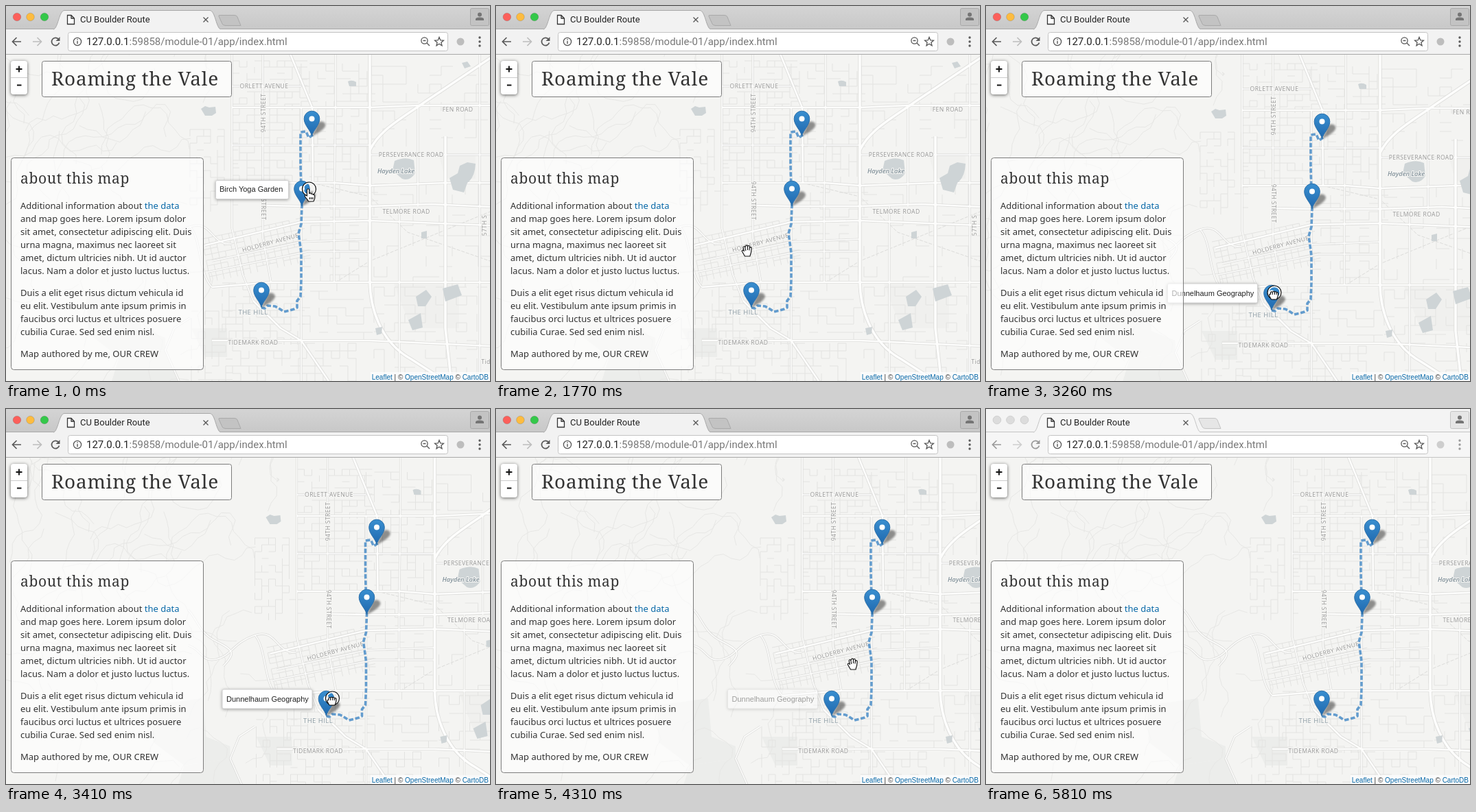
An HTML page that plays this animation: 705 px wide and 547 px high, repeating every 5910 ms.

```html
<!DOCTYPE html>
<html lang="en">
<head>
<meta charset="utf-8">
<title>CU Boulder Route</title>
<style>
html, body { margin: 0; width: 100%; height: 100%; overflow: hidden; background: #f4f4f2; }
svg { display: block; width: 705px; height: 547px; }
text { white-space: pre; }
.ui { font-family: Roboto, sans-serif; }
.serif { font-family: "Noto Serif", serif; fill: #333; }
.body { font: 13px "Noto Sans", sans-serif; fill: #333; }
.small { font: 10px "Liberation Sans", Arial, sans-serif; fill: #333; }
.tip { font: 11px "Liberation Sans", Arial, sans-serif; fill: #222; }
.link { fill: #0768a8; }
.labels { font: 8.6px "Open Sans", sans-serif; letter-spacing: .4px; fill: #979797;
  text-anchor: middle; paint-order: stroke; stroke: #f6f6f4; stroke-width: 2px; }
.box { fill: #fff; fill-opacity: .64; stroke: #7c7c7c; }
.zoom { filter: drop-shadow(0 1px 2.5px rgba(0,0,0,.6)); }
.tipbox { fill: #fff; stroke: #d2d2d2; filter: drop-shadow(0 1px 2px rgba(0,0,0,.35)); }
#chrome { --icon: #5a5a5a; --faint: #bdbdbd; --line: #a9a9a9; --tab: #c3c3c3; --bar: #f2f2f2; }
#chrome.idle { --icon: #9b9b9b; --faint: #cecece; --line: #c4c4c4; --tab: #e6e6e6; --bar: #f6f6f6; }
.bar { fill: url(#titlebar); }
.idle .bar { fill: #f4f4f4; }
.idle .light { fill: #dcdcdc; stroke: #d0d0d0; }
</style>
</head>
<body>
<svg viewBox="0 0 705 547" xmlns="http://www.w3.org/2000/svg">
  <defs>
    <linearGradient id="titlebar" x2="0" y2="1"><stop stop-color="#d4d4d4"/><stop offset="1" stop-color="#c8c8c8"/></linearGradient>
    <linearGradient id="blue" x2="0" y2="1"><stop stop-color="#3a8fd0"/><stop offset="1" stop-color="#1f68ae"/></linearGradient>
    <filter id="soft" x="-50%" y="-50%" width="200%" height="200%"><feGaussianBlur stdDeviation="1.8"/></filter>
    <g id="pin">
      <path d="M0 0L9-20Q17-24 20-17Q20-10 0 0Z" fill="#000" opacity=".42" filter="url(#soft)"/>
      <path d="M0-.5C-2-9-11.3-16-11.3-25.5A11.3 11.3 0 0 1 11.3-25.5C11.3-16 2-9 0-.5Z" fill="url(#blue)" stroke="#2b6fa9"/>
      <circle cy="-25.5" r="4" fill="#fff"/>
    </g>
  </defs>

  <rect width="705" height="547" fill="#f4f4f2"/>
  <g id="map">
    <g id="land"></g>
    <g id="trails" fill="none" stroke="#e7e7e5"></g>
    <g id="streets" fill="none" stroke="#e3e3e1"></g>
    <g id="casing" fill="none" stroke="#dcdcda" stroke-linejoin="round"></g>
    <g id="roads" fill="none" stroke="#fdfdfc" stroke-linejoin="round"></g>
    <g id="water" fill="#ced4d6"></g>
    <g id="labels" class="labels"></g>
    <path fill="none" stroke="#4b8dc8" stroke-opacity=".85" stroke-width="3.6" stroke-dasharray="6.5 2.8" stroke-linejoin="round"
      d="M372 440L377 441L381 437L392 438L399 442L405 446L413 444L420 442L424 440V430L429 424L430 400V360L428 345L426 332L430 318L431 292L430 270L429 230V184L437 183L441 192L447 188"/>
    <use href="#pin" x="445.5" y="190"/>
    <use href="#pin" x="431" y="292"/>
    <use href="#pin" x="372" y="440"/>
    <g id="tipA"><rect class="tipbox" x="305.5" y="254.5" width="106" height="27" rx="2"/><text class="tip" x="311" y="271">Birch Yoga Garden</text></g>
    <g id="tipB"><rect class="tipbox" x="220.5" y="401" width="131" height="28" rx="2"/><text class="tip" x="226.500" y="418.500">Dunnelhaum Geography</text></g>
  </g>

  <g class="zoom"><rect x="7" y="80" width="24" height="49" rx="4" fill="#fff"/></g>
  <path d="M7 104.500H31" stroke="#ccc"/>
  <path d="M14.500 92H23.500M19 87.500V96.500M16 115.500H22.500" stroke="#111" stroke-width="1.900"/>

  <rect class="box" x="52.500" y="80.500" width="276" height="52" rx="3"/>
  <text class="serif" x="66" y="116" font-size="28" letter-spacing=".7">Roaming the Vale</text>
  <rect class="box" x="7.500" y="221.500" width="280" height="309" rx="4"/>
  <text class="serif" x="21" y="259" font-size="21" letter-spacing=".65">about this map</text>
  <g id="about" class="body"></g>

  <rect x="531" y="534" width="174" height="13" fill="#fff" fill-opacity=".7"/>
  <text class="small" x="703" y="544.500" text-anchor="end"><tspan class="link">Leaflet</tspan> | © <tspan class="link">OpenStreetMap</tspan> © <tspan class="link">CartoDB</tspan></text>

  <g id="chrome" class="ui">
    <rect class="bar" width="705" height="34"/>
    <rect y="33" width="705" height="38" style="fill:var(--bar)"/>
    <path d="M0 33.500H705M0 70.500H705" style="stroke:var(--line)"/>
    <path d="M69 34C76 33 77 7 85 6.500H297C305 7 306 33 313 34" style="fill:var(--bar);stroke:var(--line)"/>
    <rect x="70" y="34" width="243" height="2" style="fill:var(--bar)"/>
    <path d="M311 13.500H333Q336 13.500 337 16L342 28.500H320Q316 28.500 315 26L310 15Q309.500 13.500 311 13.500Z" style="fill:var(--tab);stroke:var(--line)"/>
    <g id="lights"></g>
    <path d="M89.500 13.500H95L99.500 18V26.500H89.500ZM95 13.500V18H99.500" fill="#fff" stroke="#333" stroke-width="1.300"/>
    <text x="108" y="24.300" font-size="13" fill="#222">CU Boulder Route</text>
    <path d="M287.500 16.500L294.500 23.500M294.500 16.500L287.500 23.500" stroke="#555" stroke-width="1.300"/>
    <rect x="676.500" y="3.500" width="27" height="25" rx="2" style="fill:var(--tab);stroke:var(--line)"/>
    <path d="M684 21V19Q684 16.500 690 16.500T696 19V21Z" fill="#757575"/><circle cx="690" cy="12.500" r="3" fill="#757575"/>
    <g fill="none" stroke-width="1.700">
      <path d="M22 52H10M15.500 46L9.500 52L15.500 58" style="stroke:var(--icon)"/>
      <path d="M39 52H51M45.500 46L51.500 52L45.500 58" style="stroke:var(--faint)"/>
      <path d="M76.300 48.300A5.600 5.600 0 1 0 77.500 53.500" style="stroke:var(--icon)"/>
    </g>
    <path d="M78.500 45V51H72.500Z" style="fill:var(--icon)"/>
    <rect x="90.500" y="38.500" width="553" height="27" rx="3" fill="#fff" stroke="#c3c3c3"/>
    <circle cx="104" cy="52" r="5.600" fill="none" stroke="#555" stroke-width="1.300"/>
    <path d="M104 51V55.300M104 48.300V49.800" stroke="#555" stroke-width="1.400"/>
    <text x="117" y="57.300" font-size="15" fill="#222">127.0.0.1<tspan fill="#777">:59858/module-01/app/index.html</tspan></text>
    <g fill="none" stroke="#555" stroke-width="1.300">
      <circle cx="609.500" cy="50.500" r="4.600"/><path d="M613 54L617 58M607.500 50.500H611.500"/>
      <path d="M631 45.500L632.800 49.900L637.400 50.200L633.900 53.200L635 57.800L631 55.300L627 57.800L628.100 53.200L624.600 50.200L629.200 49.900Z"/>
    </g>
    <circle cx="662" cy="52" r="5.500" style="fill:var(--faint)"/>
    <path d="M690 46V46.100M690 52V52.100M690 58V58.100" stroke-width="3.400" stroke-linecap="round" style="stroke:var(--icon)"/>
  </g>

  <g id="ring" fill="none"><circle r="8.800" stroke="#fff" stroke-width="2.200"/><circle r="10" stroke="#111" stroke-width="1.200"/></g>
  <g id="cursor" fill="#fff" stroke="#111" stroke-width="1.150" stroke-linejoin="round">
    <path id="point" d="M-3 1.500C-3 -.8 .2 -.8 .2 1.500V6.500C1.500 5.400 3 6 3 7.200C4.400 6.400 5.800 7 5.800 8.400C7 7.800 8.200 8.400 8.200 10V13C8.200 15 7 16 6.600 18H-1C-2 15.500-4.500 13.500-6 11C-7 9-5 8.200-3.600 9.600L-3 10.200ZM1 12V15M3.300 12V15M5.500 12V15"/>
    <path id="open" d="M-3.500 8L-7.500 1C-8.200-1-6-1.600-4.600 .6L-5.800-4.600C-6-6.600-3.800-7-3.200-5L-2.400-6.600C-2-8.400 .2-8.400 .4-6.600L.6-5.800C1-8 3.200-8 3.400-6V-4C4-5.800 6.400-5.400 6.200-3.400L5.600 2C5.400 4 4 6 4 8ZM-3.200-5L-2.200 0M.5-6V-1M3.400-4.500L3-.5"/>
    <path id="fist" transform="translate(-1 2)" d="M-3.500 8L-6 3.500C-7 1-6 0-4.600 .4V-1.400C-4.600-3.600-2-3.600-1.800-2.400C-1-4 1-4 1.400-2.600C2-3.800 4-3.400 4.200-2C5.400-2.800 6.800-2 6.600 0L6 4L4.400 8ZM-1.800-2.400V1M1.400-2.600V1M4.200-2V1"/>
  </g>
</svg>
<script>
const $ = id => document.getElementById(id);
const add = (id, markup) => $(id).insertAdjacentHTML("beforeend", markup);

let seed = 11;
const rnd = () => (seed = seed * 16807 % 2147483647) / 2147483647;

// Parks and hills
add("land", `<g fill="#ecedeb">
  <path d="M118 424L192 414L197 470L232 484V502L165 512L120 478Z"/>
  <path d="M165 512L232 502L252 547V560H150Z"/>
  <path d="M270 470H322V512H290Z"/>
  <path d="M630 215H684V252H640ZM565 405H660V470H590Z" fill="#f0f0ee"/></g>`);

function trail(x, y) {
  let d = `M${x} ${y}`, a = rnd() * 6.3;
  for (let i = 0; i < 16; i++) {
    a += (rnd() - .5) * 1.9;
    const px = x + Math.cos(a) * 6, py = y + Math.sin(a) * 6;
    x = Math.min(300, px + Math.cos(a) * 7);
    y = py + Math.sin(a) * 7;
    d += `Q${px.toFixed(1)} ${py.toFixed(1)} ${x.toFixed(1)} ${y.toFixed(1)}`;
  }
  return d;
}
for (let i = 0; i < 42; i++) add("trails", `<path d="${trail(rnd() * 410 - 125, 65 + rnd() * 480)}"/>`);

// Street blocks; some sides are left open
function blocks(x0, y0, x1, y1, sx, sy, keep, turn = 0) {
  let d = "";
  for (let x = x0; x < x1; x += sx)
    for (let y = y0; y < y1; y += sy) {
      if (rnd() < keep) d += `M${x} ${y}h${sx}`;
      if (rnd() < keep) d += `M${x} ${y}v${sy}`;
    }
  add("streets", `<path d="${d}" transform="rotate(${turn} ${x0} ${y0})"/>`);
}
blocks(329, 80, 430, 148, 11, 9, .55);
blocks(329, 148, 430, 258, 11, 11, .6);
blocks(430, 84, 530, 258, 12, 11, .45);
blocks(268, 180, 329, 300, 10, 10, .5);
blocks(285, 340, 432, 398, 10, 8, .85, -12);
blocks(430, 260, 530, 400, 14, 12, .4);
blocks(315, 404, 430, 488, 10, 10, .6);
blocks(270, 445, 330, 547, 10, 10, .5);
blocks(330, 492, 520, 550, 12, 11, .5);
blocks(430, 404, 530, 488, 13, 12, .45);
blocks(532, 88, 700, 205, 17, 13, .3);
blocks(536, 260, 700, 400, 19, 15, .28);
blocks(536, 410, 700, 540, 15, 13, .35);

function road(w, ...paths) {
  for (const d of paths) {
    add("casing", `<path d="${d}" stroke-width="${w + 1.6}"/>`);
    add("roads", `<path d="${d}" stroke-width="${w}"/>`);
  }
}
road(1.6,
  "M329 60V324L345 392L360 430",
  "M374 60V338L386 403",
  "M430 148V550",
  "M480 60V148L478 292V403",
  "M329 117H430",
  "M329 203H530",
  "M530 217H705",
  "M300 372L430 344L530 340",
  "M294 388L440 358L530 358",
  "M573 292V547",
  "M690 60V547",
  "M600 145V292",
  "M171 337C190 342 190 362 212 357S236 333 268 322S298 349 328 347",
  "M171 285C185 300 186 318 212 331S240 348 222 367",
  "M268 322C285 340 280 390 300 410",
  "M268 455L245 470L232 502L252 547");
road(2.6,
  "M329 148H530L600 145H705",
  "M329 258H480L530 262L640 258H705",
  "M380 291L430 292H530L620 289L705 293",
  "M290 349L430 315L530 313L705 320",
  "M300 410L386 403H705",
  "M300 488H530L705 496",
  "M410 60L446 148L447 258",
  "M360 430L400 470L430 488L470 547");
road(3.6,
  "M530 60V400C530 440 545 490 590 515L660 560",
  "M530 210C545 180 575 165 610 140L720 66",
  "M640 190V470L650 560");
add("streets", `<path d="M446 258L530 278L585 330L705 372M480 403L530 372L705 300" stroke="#dcdcda" stroke-dasharray="5 2"/>`);

add("water", `
  <path d="M284 150L290 146L296 148L305 147L306 156L300 160H290Z"/>
  <path d="M566 226Q582 219 594 225L596 244Q588 256 577 252L563 240Z"/>
  <path d="M646 251L658 244L661 233L672 228L684 230Q683 250 672 258L667 272L651 268Z"/>
  <path d="M597 424L612 414L620 424L611 438H600ZM636 412L658 406L664 422L640 431ZM586 458L604 448L607 469L592 473Z"/>
  <path d="M605 330L613 328V339H605ZM498 110Q504 107 510 111V117H500ZM664 83L672 81L677 88L668 91ZM538 470L548 468L547 478L540 480Z"/>`);

function label(text, x, y, turn = 0, extra = "") {
  add("labels", `<text transform="translate(${x} ${y}) rotate(${turn})" ${extra}>${text}</text>`);
}
label("ORLETT AVENUE", 376, 120);
label("94TH STREET", 377.5, 156, -90);
label("94TH STREET", 372, 284, 90);
label("FEN ROAD", 658, 154);
label("PERSEVERANCE ROAD", 590, 220);
label("TELMORE ROAD", 583, 303);
label("HOLDERBY AVENUE", 386, 348, -15);
label("TIDEMARK ROAD", 360, 494);
label("57TH S", 700, 320, -90);
label("Tid", 699, 522);
label("THE HILL", 360, 450, 0, 'style="font-size:9.600px;fill:#8b9aa3"');
label("Hayden Lake", 568, 244, 0, 'style="font-size:9.300px;font-weight:600;font-style:italic;letter-spacing:0;fill:#83929b"');

[["#fc605b", 16], ["#fdbc40", 35.5], ["#34c84a", 56]].forEach(([c, x]) =>
  add("lights", `<circle class="light" cx="${x}" cy="16" r="5.800" fill="${c}" stroke="#0002"/>`));

const about = [
  [`Additional information about <tspan class="link">the data</tspan>`,
    "and map goes here. Lorem ipsum dolor", "sit amet, consectetur adipiscing elit. Duis",
    "urna magna, maximus nec laoreet sit", "amet, dictum ultricies nibh. Ut id auctor",
    "lacus. Nam a dolor et justo luctus luctus."],
  ["Duis a elit eget risus dictum vehicula id", "eu elit. Vestibulum ante ipsum primis in",
    "faucibus orci luctus et ultrices posuere", "cubilia Curae. Sed sed enim nisl."],
  ["Map authored by me, OUR CREW"]
];
let line = 295.5;
for (const para of about) {
  for (const s of para) { add("about", `<text x="21" y="${line}">${s}</text>`); line += 19; }
  line += 13;
}

// Steps: time, then the values that hold from that time on
const LOOP = 5910;
const pointer = [
  [0, 441.5, 267, "point", 1],
  [140, 441.5, 267, "point", 0],
  [290, 440, 226, "open", 0],
  [440, 443, 180, "point", 0],
  [590, 443.5, 162, "point", 1],
  [1330, 443.5, 162, "point", 0],
  [1480, 434, 205, "open", 0],
  [1620, 400, 285, "open", 0],
  [1770, 366, 357, "open", 0],
  [1920, 364, 388, "open", 0],
  [2070, 368, 409, "point", 0],
  [2220, 370.5, 413.5, "point", 0],
  [2970, 370.5, 413.5, "point", 1],
  [3260, 420, 418, "fist", 1],
  [3410, 475.5, 422, "fist", 1],
  [3560, 486, 423, "fist", 1],
  [3710, 488.5, 423, "fist", 1],
  [4160, 488.5, 423, "point", 0],
  [4310, 520, 372, "open", 0],
  [4460, 595, 262, "open", 0],
  [4610, 668, 205, "open", 0],
  [4760, 672, 300, "open", 0],
  [4910, 662, 435, "open", 0],
  [5060, 0, 0, "", 0]
];
const pan = [[0, 0, 0], [3260, 44, 4], [3410, 94.5, 8], [3560, 113, 8], [3710, 117, 8]];
const tipA = [[0, 1], [290, .4], [440, 0]];
const tipB = [[0, 0], [2220, .5], [2370, 1], [4310, .4], [4460, 0]];

const at = (steps, t) => steps.findLast(s => s[0] <= t);

function draw() {
  const t = performance.now() % LOOP;
  const [, x, y, shape, pressed] = at(pointer, t);
  const [, dx, dy] = at(pan, t);
  $("map").setAttribute("transform", `translate(${dx} ${dy})`);
  for (const id of ["cursor", "ring"]) $(id).setAttribute("transform", `translate(${x} ${y})`);
  for (const id of ["point", "open", "fist"]) $(id).style.display = id === shape ? "" : "none";
  $("ring").style.display = pressed ? "" : "none";
  $("tipA").style.opacity = at(tipA, t)[1];
  $("tipB").style.opacity = at(tipB, t)[1];
  $("chrome").classList.toggle("idle", t >= 5810);
  requestAnimationFrame(draw);
}
draw();
</script>
</body>
</html>
```
